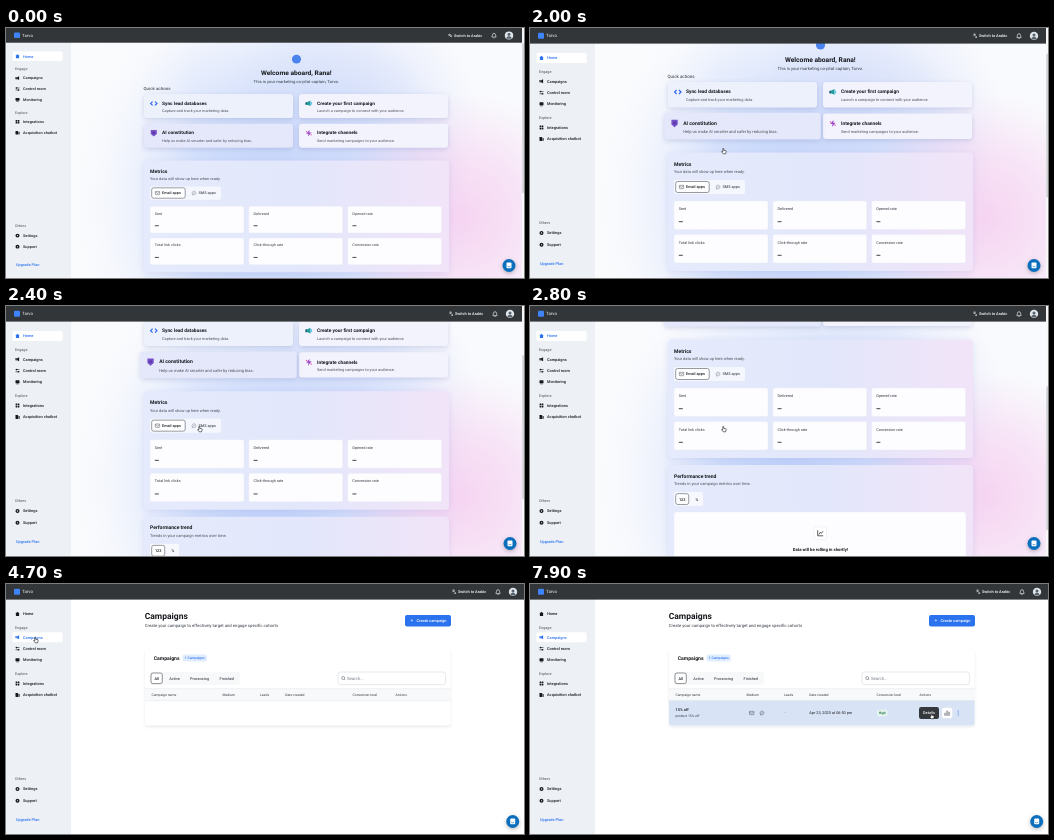
Write an HTML page with a canvas that moves like this. It is 518x250 px and loops after 8000 ms.

```html
<!DOCTYPE html>
<html lang="en">
<head>
<meta charset="utf-8">
<title>Campaign dashboard</title>
<style>
html, body { margin: 0; width: 518px; height: 250px; overflow: hidden; background: #fff; }
canvas { display: block; width: 518px; height: 250px; }
</style>
</head>
<body>
<canvas id="stage"></canvas>
<script>
const W = 518, H = 250, LOOP = 8000, STEP = 100;
const canvas = document.getElementById('stage');
const g = canvas.getContext('2d');
const dpr = window.devicePixelRatio || 1;
canvas.width = W * dpr;
canvas.height = H * dpr;

const INK = '#15181c', GREY = '#4b5058', BLUE = '#2b72ee';
const BRAND = 'Tarvo';

// Keyframes are [time, value, ...]; values are linear between them.
const SQUASH = [[0, .943], [300, 1]];
const SCROLL = [[1800, 0], [2200, 32], [2500, 67], [2800, 107], [3000, 144]];
const HOVER = [[600, 0], [800, 1]];
const POINTER = [
  [700, 196, 126], [800, 194, 123], [3600, 194, 123], [3800, 85, 76], [3900, 85, 76],
  [4100, 30, 56], [5000, 30, 56], [5200, 160, 102], [5700, 160, 102], [5800, 171, 131],
  [6100, 200, 132], [6200, 200, 132], [6400, 326, 140], [6500, 326, 140],
  [7100, 409, 134], [7400, 409, 134], [7500, 406, 134], [7700, 406, 134], [7900, 402, 132]
];

function track(keys, t) {
  if (t <= keys[0][0]) return keys[0].slice(1);
  for (let i = 1; i < keys.length; i++) {
    const a = keys[i - 1], b = keys[i];
    if (t <= b[0]) {
      const u = (t - a[0]) / (b[0] - a[0]);
      return a.slice(1).map((v, j) => v + (b[j + 1] - v) * u);
    }
  }
  return keys[keys.length - 1].slice(1);
}

function text(str, x, y, size, color = INK, weight = 400, align = 'left') {
  g.font = `${weight} ${size}px Roboto, "Open Sans", sans-serif`;
  g.textAlign = align;
  g.fillStyle = color;
  g.fillText(str, x, y + size * .35);
}

function box(x, y, w, h, r, fill, stroke, lw = .5) {
  g.beginPath();
  g.roundRect(x, y, w, h, r);
  if (fill) { g.fillStyle = fill; g.fill(); }
  if (stroke) { g.strokeStyle = stroke; g.lineWidth = lw; g.stroke(); }
}

function shadowBox(x, y, w, h, r, fill, color = 'rgba(80,95,160,.22)', blur = 5) {
  g.save();
  g.shadowColor = color;
  g.shadowBlur = blur * dpr;
  g.shadowOffsetY = 1.5 * dpr;
  box(x, y, w, h, r, fill);
  g.restore();
}

function dot(x, y, r, color) {
  g.beginPath();
  g.arc(x, y, r, 0, 7);
  g.fillStyle = color;
  g.fill();
}

function line(points, color, lw = .6) {
  g.beginPath();
  points.forEach(([x, y], i) => i ? g.lineTo(x, y) : g.moveTo(x, y));
  g.strokeStyle = color;
  g.lineWidth = lw;
  g.stroke();
}

function poly(points, fill, stroke) {
  g.beginPath();
  points.forEach(([x, y]) => g.lineTo(x, y));
  g.closePath();
  g.fillStyle = fill;
  g.fill();
  if (stroke) { g.strokeStyle = stroke; g.lineWidth = .6; g.stroke(); }
}

function glow(x, y, r, rgb, a) {
  const c = g.createRadialGradient(x, y, 0, x, y, r);
  c.addColorStop(0, `rgba(${rgb},${a})`);
  c.addColorStop(.5, `rgba(${rgb},${a * .6})`);
  c.addColorStop(1, `rgba(${rgb},0)`);
  g.fillStyle = c;
  g.fillRect(65, 0, W - 65, H);
}

const at = (x, y, draw) => {
  g.save();
  g.translate(x, y);
  draw();
  g.restore();
};

const mail = (x, y, c = GREY) => at(x, y, () => {
  box(-2.2, -1.7, 4.4, 3.4, .6, null, c);
  line([[-2.2, -1.2], [0, .4], [2.2, -1.2]], c, .5);
});

const chat = (x, y, c = GREY) => at(x, y, () => {
  g.beginPath();
  g.arc(0, 0, 1.9, 2.4, 8.2);
  g.lineTo(-1.9, 2);
  g.closePath();
  g.strokeStyle = c;
  g.lineWidth = .5;
  g.stroke();
  line([[-.8, 0], [.9, 0]], c, .5);
});

const navIcon = {
  home: c => poly([[-2.2, -.2], [0, -2.2], [2.2, -.2], [1.6, -.2], [1.6, 2], [-1.6, 2], [-1.6, -.2]], c),
  campaigns: c => { poly([[-.4, -1], [1.6, -2], [1.6, 2], [-.4, 1]], c); box(-2, -1.2, 1.3, 2.5, .4, c); },
  control: c => {
    line([[-2, -1], [2, -1]], c);
    line([[-2, 1.2], [2, 1.2]], c);
    dot(-.9, -1, .8, c);
    dot(.9, 1.2, .8, c);
  },
  monitor: c => { box(-2, -1.8, 4, 3, .5, c); line([[-1.2, 1.9], [1.2, 1.9]], c); },
  tiles: c => [[-1.9, -1.9], [.2, -1.9], [-1.9, .2], [.2, .2]].forEach(p => box(p[0], p[1], 1.7, 1.7, .3, c)),
  bot: c => { box(-2, -1.9, 2.6, 3.8, .4, c); box(1, -.9, 1.1, 2.8, .3, c); },
  gear: c => { dot(0, 0, 2, c); dot(0, 0, .7, '#eef2f6'); },
  help: c => { dot(0, 0, 2, c); text('?', 0, 0, 3, '#fff', 700, 'center'); }
};

function sidebar(view, active) {
  g.fillStyle = '#edf1f5';
  g.fillRect(0, 0, 65, view);
  const low = view - H;
  const heading = (s, y) => text(s, 9, y, 3.75, GREY);
  const item = (icon, label, y, id) => {
    const on = id === active;
    if (on) box(6.5, y - 5, 50, 10, 1.5, '#fff');
    const c = on ? BLUE : INK;
    at(11.5, y, () => navIcon[icon](c));
    text(label, 17, y, 3.9, c, 500);
  };
  item('home', 'Home', 30, 'home');
  heading('Engage', 43.5);
  item('campaigns', 'Campaigns', 53.2, 'campaigns');
  item('control', 'Control room', 64.6);
  item('monitor', 'Monitoring', 76);
  heading('Explore', 90);
  item('tiles', 'Integrations', 99.5);
  item('bot', 'Acquisition chatbot', 111);
  heading('Others', 195 + low);
  item('gear', 'Settings', 205 + low);
  item('help', 'Support', 216.8 + low);
  text('Upgrade Plan', 10, 235.5 + low, 3.9, BLUE, 500);
}

function header(shift) {
  g.fillStyle = '#323638';
  g.fillRect(0, 0, W, 15.6);
  box(8, 4.7, 6, 6, 1, '#3f83f8');
  text(BRAND, 16, 7.9, 4.4, '#f4f5f6');
  at(shift, 0, () => {
    text('文', 443, 7, 3, '#fff', 700);
    text('A', 445.2, 8.8, 2.8, '#fff', 700);
    text('Switch to Arabic', 449, 7.8, 3.9, '#fff', 500);
    g.beginPath();
    g.arc(489, 7.2, 1.5, Math.PI, 0);
    g.lineTo(491.1, 9.6);
    g.lineTo(486.9, 9.6);
    g.closePath();
    g.strokeStyle = '#fff';
    g.lineWidth = .6;
    g.stroke();
    dot(489, 10.5, .5, '#fff');
    dot(504, 7.9, 4.2, '#dfe5ea');
    dot(504, 6.9, 1.5, '#59636d');
    g.beginPath();
    g.arc(504, 11.4, 2.6, Math.PI, 0);
    g.fill();
  });
}

function helpButton(x) {
  shadowBox(x - 6.5, 231, 13, 13, 6.5, '#0b6fbd', 'rgba(0,0,0,.25)', 4);
  box(x - 2.5, 234.6, 5, 5.6, .9, '#fff');
  line([[x - 1.5, 238.3], [x, 238.8], [x + 1.5, 238.3]], '#0b6fbd', .6);
}

function backdrop() {
  g.fillStyle = '#f9fafd';
  g.fillRect(0, 0, W, H);
  glow(265, 175, 200, '178,200,250', .85);
  glow(345, 95, 130, '205,216,250', .6);
  glow(455, 190, 125, '245,200,238', .75);
  const fade = g.createLinearGradient(65, 0, 190, 0);
  fade.addColorStop(0, 'rgba(250,251,253,.9)');
  fade.addColorStop(1, 'rgba(250,251,253,0)');
  g.fillStyle = fade;
  g.fillRect(65, 0, 125, H);
}

const actionIcon = [
  () => {
    line([[-1.2, -2], [-3.2, 0], [-1.2, 2]], '#2563eb', 1.1);
    line([[1.2, -2], [3.2, 0], [1.2, 2]], '#2563eb', 1.1);
  },
  () => {
    poly([[-2.4, -1], [1.7, -3], [1.7, 2.8], [-2.4, 1.1]], '#219c9c');
    box(-3.4, -1.3, 1.6, 2.8, .5, '#155e75');
    line([[2.8, -1.5], [2.8, 1.5]], '#38bdf8', .9);
  },
  () => {
    poly([[-3, -3.4], [3, -3.4], [3, 1], [0, 3.6], [-3, 1]], '#7650c8');
    box(-1.4, -1.5, 2.8, 2.3, .5, '#5b36aa');
  },
  () => {
    poly([[.8, -3.5], [-2.6, .6], [-.3, .6], [-.9, 3.5], [2.7, -.8], [.4, -.8]], '#9b45c9');
    dot(-2.3, -1.6, .7, '#ec4899');
    dot(2.3, 1.8, .7, '#ec4899');
  }
];

function actionCard(i, title, note, hover) {
  const x = 138 + i % 2 * 155, y = i < 2 ? 70 : 101.5;
  at(x + 74.5, y + 12.7, () => {
    const s = 1 + .05 * hover;
    g.scale(s, s);
    shadowBox(-74.5, -12.7, 149, 25.4, 3, i === 2 ? '#e4e8fa' : i === 0 ? '#edf1fc' : '#f3f3fd');
    at(-64.7, -2.7, actionIcon[i]);
    text(title, -56.5, -3, 4.85, INK, 700);
    text(note, -56.5, 5.2, 3.9, GREY);
  });
}

function panel(y, h) {
  const c = g.createLinearGradient(138, 0, 443, 0);
  c.addColorStop(0, '#e5ebfc');
  c.addColorStop(.5, '#e2e7fb');
  c.addColorStop(1, '#f2e4f8');
  shadowBox(138, y, 305, h, 3.5, c, 'rgba(90,100,190,.14)', 6);
}

function home(t, view, scroll) {
  g.save();
  g.translate(0, -scroll);
  dot(290.5, 33, 4.6, '#4b83ee');
  text('Welcome aboard, Rana!', 290.3, 48, 6.7, INK, 700, 'center');
  text(`This is your marketing co-pilot captain, ${BRAND}.`, 290.3, 57, 4.25, '#333941', 400, 'center');
  text('Quick actions', 137.5, 64, 4.5, '#2a2f36');
  const hover = track(HOVER, t)[0];
  actionCard(0, 'Sync lead databases', 'Capture and track your marketing data.', 0);
  actionCard(1, 'Create your first campaign', 'Launch a campaign to connect with your audience.', 0);
  actionCard(3, 'Integrate channels', 'Send marketing campaigns to your audience.', 0);
  actionCard(2, 'AI constitution', 'Help us make AI smarter and safer by reducing bias.', hover);

  panel(140.5, 118.5);
  text('Metrics', 144, 152, 5.1, INK, 700);
  text('Your data will show up here when ready.', 144, 159.8, 4, GREY);
  box(144, 168, 71, 14, 2, 'rgba(255,255,255,.65)');
  box(145.7, 169.5, 33.5, 11, 2, '#fff', '#555b63', .6);
  mail(151.5, 175);
  text('Email apps', 156, 175, 3.85, INK, 500);
  chat(188, 175, '#777e88');
  text('SMS apps', 192.5, 175, 3.85, GREY, 500);
  ['Sent', 'Delivered', 'Opened rate', 'Total link clicks', 'Click-through rate', 'Conversion rate']
    .forEach((label, i) => {
      const x = 144 + i % 3 * 98.8, y = 189 + (i > 2 ? 33.6 : 0);
      box(x, y, 94, 28.5, 2, '#fdfdff', '#e6e8f3', .4);
      text(label, x + 4.7, y + 7.6, 3.8, '#343a43');
      line([[x + 4.8, y + 20.7], [x + 8.8, y + 20.7]], INK, .8);
    });

  panel(266, 117);
  text('Performance trend', 144, 277, 5, INK, 700);
  text('Trends in your campaign metrics over time.', 144, 284.8, 4, GREY);
  box(144, 293, 29, 14, 2, 'rgba(255,255,255,.65)');
  box(145.7, 294.7, 13, 10.8, 2, '#fff', '#555b63', .6);
  text('123', 152.2, 300.2, 3.9, INK, 500, 'center');
  text('%', 166.8, 300.2, 3.8, INK, 500, 'center');
  box(144, 313, 292, 62, 2.5, '#fdfdff', '#e6e8f3', .4);
  box(284, 328, 12.5, 12.5, 2, '#fff', '#e1e4eb', .5);
  line([[287.7, 331.3], [287.7, 336.8], [293.2, 336.8]], INK, .7);
  line([[288.8, 335.4], [290.3, 333.4], [291.3, 334.4], [293, 332.2]], INK, .7);
  text('Data will be rolling in shortly!', 290.3, 351, 4.25, INK, 700, 'center');
  text('Your data will show up here when ready.', 290.3, 358.6, 4, GREY, 400, 'center');
  g.restore();
}

function scrollbar(view, scroll) {
  g.fillStyle = '#f8f8f9';
  g.fillRect(516, 0, 2, view);
  box(516.4, 16 + scroll * .6, 1.4, view - 106, .7, '#c5c7cb');
}

function campaignRow(hover) {
  if (hover) box(139, 116.6, 305.6, 25, [0, 0, 3, 3], '#d9e3f6');
  text('15% off', 145.5, 126, 3.9, INK, 500);
  text('product 15% off', 145.5, 132.2, 3.4, '#333941');
  mail(221.7, 129);
  chat(232, 129);
  text('-', 254.5, 129, 3.8, GREY);
  text('Apr 23, 2025 at 06:50 pm', 279.3, 129, 3.85, INK);
  box(347, 125.7, 10.5, 6.6, 1.8, '#e5f5ec');
  text('High', 352.2, 129, 3.4, '#146943', 500, 'center');
  box(389, 123, 20, 12, 2.2, '#34383c');
  text('Details', 399, 129, 3.85, '#fff', 500, 'center');
  box(411.7, 123.5, 10.8, 11, 2, '#fff', '#d9dde4', .5);
  [2.4, 4.6, 3.4].forEach((h, i) => box(414.6 + i * 2, 131.5 - h, 1, h, .2, null, GREY, .45));
  [-2, 0, 2].forEach(d => dot(428.2, 129 + d, .55, BLUE));
}

function campaigns(t) {
  text('Campaigns', 138.7, 32.5, 8.5, INK, 700);
  text('Create your campaign to effectively target and engage specific cohorts', 138.8, 42, 4.25, '#343a42');
  box(399, 31, 46, 11.4, 2, BLUE);
  text('+', 405.8, 36.5, 5, '#fff', 400, 'center');
  text('Create campaign', 410.5, 36.7, 3.95, '#fff', 500);

  shadowBox(139, 65, 305.6, 76.6, 3, '#fff', 'rgba(40,50,70,.1)', 3);
  text('Campaigns', 147.7, 74, 5.1, INK, 700);
  box(176.5, 70.4, 24.5, 7, 2.5, '#e0edff');
  text('1 Campaigns', 188.7, 73.9, 3.4, BLUE, 500, 'center');
  box(143.8, 87.8, 90, 13, 2, '#f7f8f9');
  box(145, 89, 11.3, 10.6, 2, '#fff', '#454a51', .6);
  text('All', 150.7, 94.2, 3.8, INK, 500, 'center');
  text('Active', 163.2, 94.2, 3.8, GREY, 500);
  text('Processing', 184, 94.2, 3.8, GREY, 500);
  text('Finished', 213.6, 94.2, 3.8, GREY, 500);
  box(332, 88, 107.5, 12.6, 2.5, '#fff', '#d4d8df', .6);
  g.beginPath();
  g.arc(337.2, 94, 1.5, 0, 7);
  g.strokeStyle = GREY;
  g.lineWidth = .5;
  g.stroke();
  line([[338.3, 95.1], [339.3, 96.1]], GREY, .5);
  text('Search...', 341, 94.3, 4.3, '#747b85');

  g.fillStyle = '#f8f9fb';
  g.fillRect(139, 104.7, 305.6, 11.9);
  line([[139, 104.7], [444.6, 104.7]], '#e2e5e9', .5);
  line([[139, 116.6], [444.6, 116.6]], '#e2e5e9', .5);
  [['Campaign name', 145.5], ['Medium', 216.5], ['Leads', 254], ['Date created', 279.3],
    ['Conversion level', 346.5], ['Actions', 389.5]]
    .forEach(([s, x]) => text(s, x, 110.6, 3.4, '#30353c'));
  if (t >= 4900) campaignRow(t >= 5800);
}

function pointer(t) {
  if (t < 700) return;
  const [x, y] = track(POINTER, t);
  const hand = t < 5100 || t >= 7100;
  at(x, y, () => {
    g.lineJoin = 'round';
    if (hand) {
      poly([[-1.2, -2.4], [-.3, -2.4], [-.2, -.7], [1.9, -.2], [2.2, .5], [1.6, 2.8],
        [-.8, 2.8], [-2.3, .8], [-1.9, .1], [-1.1, .7]], '#fff', '#15181c');
    } else {
      poly([[0, -2.3], [0, 2], [1, 1.1], [1.7, 2.6], [2.4, 2.3], [1.7, .8], [3, .7]], '#111', '#fff');
    }
  });
}

function draw(t) {
  const onHome = t < 4700;
  const k = track(SQUASH, t)[0];
  const scroll = track(SCROLL, t)[0];
  const view = H / k;
  g.setTransform(dpr, 0, 0, dpr, 0, 0);
  g.textBaseline = 'alphabetic';
  g.textRendering = 'geometricPrecision';
  g.fillStyle = '#fff';
  g.fillRect(0, 0, W, H);
  if (onHome) backdrop();
  g.save();
  g.scale(1, k);
  if (onHome) home(t, view, scroll);
  else campaigns(t);
  sidebar(view, onHome ? 'home' : 'campaigns');
  header(onHome ? (k < 1 ? -1 : 0) : 3);
  if (onHome) scrollbar(view, scroll);
  g.restore();
  helpButton(onHome ? (k < 1 ? 503 : 504) : 506.7);
  pointer(t);
}

const start = performance.now();
function tick() {
  const t = (performance.now() - start) % LOOP;
  draw(Math.floor(t / STEP) * STEP);
  requestAnimationFrame(tick);
}
tick();
</script>
</body>
</html>
```
